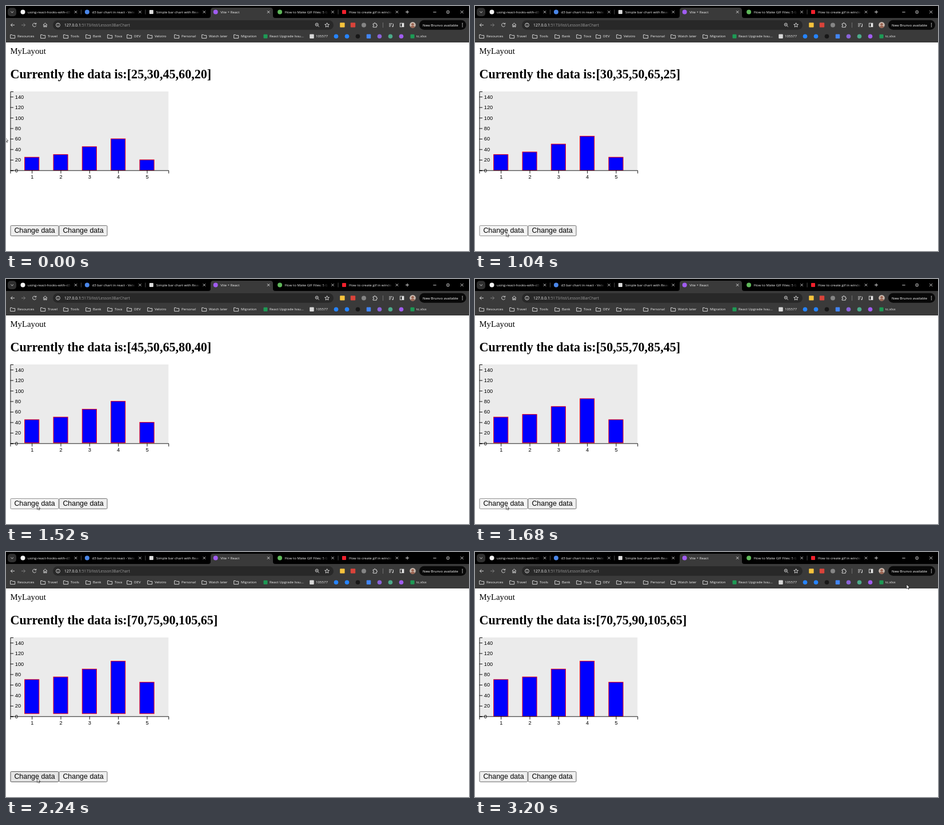
An HTML page that plays this animation: 810x430 px, repeating every 3.28 s.

```html
<!DOCTYPE html>
<html lang="en">
<head>
<meta charset="utf-8">
<title>Bar chart</title>
<style>
  html, body { margin: 0; width: 100%; height: 100%; overflow: hidden; background: #fff; }
  svg { display: block; }
  .ui { font: 6.15px "Open Sans", "Noto Sans", sans-serif; fill: #f4f4f4; }
  .line { fill: none; stroke: #e6e6e6; stroke-width: .9; }
  .serif { font-family: "Liberation Serif", "Times New Roman", serif; }
  .axis { font: 10px "Liberation Sans", Arial, sans-serif; }
  .axis path { fill: none; stroke: #000; }
  .bars rect { fill: #00f; stroke: #f00; }
  .button rect { fill: #efefef; stroke: #6c6c6c; }
  .button text { font: 12.45px "Liberation Sans", Arial, sans-serif; text-anchor: middle; }
  .button.hover rect { fill: #e5e5e5; stroke: #4f4f4f; }
  .button.active rect { fill: #f5f5f5; stroke: #8d8d8d; }
</style>
</head>
<body>
<svg id="stage" width="810" height="430" viewBox="0 0 810 430">
  <defs>
    <linearGradient id="fade">
      <stop offset="0" stop-color="#000" stop-opacity="0"/>
      <stop offset=".6" stop-color="#000"/>
    </linearGradient>
    <clipPath id="face"><circle cx="711.5" cy="33.3" r="5.3"/></clipPath>
  </defs>

  <rect width="810" height="430" fill="#fff"/>
  <rect width="810" height="22" fill="#000"/>
  <rect y="21" width="810" height="43" fill="#3a3a3a"/>
  <path d="M354 21q4 0 4-4V8q0-5 5-5h99q5 0 5 5v9q0 4 4 4z" fill="#3a3a3a"/>
  <rect x="3" y="3.3" width="15" height="14.6" rx="5" fill="#303030"/>
  <path class="line" d="M8.4 9.5l2.3 2.3 2.3-2.3"/>
  <g id="tabs"></g>
  <path class="line" d="M699 10.5h6M702 7.5v6M747.3 10.8h5.4M771.3 8.7h3.8v3.8h-3.8zM795.2 8l5 5m0-5l-5 5"/>

  <rect x="82" y="25" width="491" height="16.8" rx="8.4" fill="#282828"/>
  <g class="line">
    <path d="M15 33.4H8.4m3-3l-3 3 3 3"/>
    <path d="M27 33.4h6.6m-3-3l3 3-3 3" stroke="#858585"/>
    <path d="M52.2 31.4a3.1 3.1 0 1 0 .4 3M52.8 29.6v2.2h-2.4"/>
    <path d="M65 33.2l3.5-3.2 3.5 3.2M66 32.5v4.2h1.7v-2.5h1.6v2.5H71v-4.2"/>
    <circle cx="91" cy="33.4" r="3.4"/>
    <path d="M91 33v2.2M91 31.2v.8"/>
    <circle cx="543.8" cy="32.6" r="2.5"/>
    <path d="M545.7 34.5l2.2 2.2M542.6 32.6h2.4"/>
    <path d="M561.6 29.6l1.1 2.6 2.8.2-2.2 1.8.7 2.8-2.4-1.5-2.4 1.5.7-2.8-2.2-1.8 2.8-.2z"/>
    <path d="M642.2 31h2q0-1.6 1-1.6t1 1.6h2v2q1.4 0 1.4 1t-1.4 1v2.2h-6v-2q1.4 0 1.4-1.1t-1.4-1.1z"/>
    <path d="M659.5 29v9" stroke="#777"/>
    <path d="M670 31h6M670 33.4h4M670 35.8h3M677.5 31v4.5"/>
    <circle cx="676.5" cy="35.8" r=".8"/>
    <rect x="689.4" y="30.2" width="6.4" height="6.4"/>
  </g>
  <rect x="692.7" y="30.2" width="3.4" height="6.4" fill="#e6e6e6"/>
  <rect x="584.2" y="29.2" width="8.4" height="8.4" rx="1" fill="#f6c33c"/>
  <rect x="602.8" y="29.2" width="8.4" height="8.4" rx="1" fill="#d9433a"/>
  <circle cx="626" cy="33.4" r="4" fill="#858585"/>
  <g clip-path="url(#face)">
    <rect x="706" y="28" width="11" height="11" fill="#c9b8ad"/>
    <circle cx="711.5" cy="32.2" r="2.3" fill="#9a6350"/>
    <ellipse cx="711.5" cy="38.6" rx="4.3" ry="3.8" fill="#9a6350"/>
  </g>
  <rect x="723" y="24.8" width="82" height="17" rx="8.5" fill="#080808"/>
  <g class="ui">
    <text x="102" y="35.8" style="font-size:6.82px">127.0.0.1<tspan fill="#9b9b9b">:5173/list/Lesson3BarChart</tspan></text>
    <text x="729" y="35.6" fill="#fff">New Brunvo available</text>
  </g>
  <g fill="#e6e6e6"><circle cx="798.5" cy="30.6" r=".8"/><circle cx="798.5" cy="33.4" r=".8"/><circle cx="798.5" cy="36.2" r=".8"/></g>
  <g id="marks"></g>

  <text class="serif" x="7.5" y="84.4" font-size="14.76">MyLayout</text>
  <text class="serif" id="title" x="7.5" y="127" font-size="22.14" font-weight="bold"></text>

  <g transform="translate(7.5 150) scale(.9225)">
    <rect width="300" height="150" fill="#ebebeb"/>
    <g class="bars" id="bars"></g>
    <g class="axis" id="axis"></g>
  </g>

  <g class="button" id="first">
    <rect x="8" y="385.4" width="84" height="18" rx="1.4"/>
    <text x="50" y="398.4">Change data</text>
  </g>
  <g class="button">
    <rect x="93" y="385.4" width="84" height="18" rx="1.4"/>
    <text x="135" y="398.4">Change data</text>
  </g>
  <path id="cursor" d="M0 0V7.5L1.8 5.9 3 8.6 4.2 8 3 5.5H5.3Z" fill="#fff" stroke="#000" stroke-width=".6"/>
</svg>

<script>
const LOOP = 3280, STEP = 80;
const $ = id => document.getElementById(id);

function add(parent, tag, attrs, text) {
  const node = document.createElementNS("http://www.w3.org/2000/svg", tag);
  for (const key in attrs) node.setAttribute(key, attrs[key]);
  if (text !== undefined) node.textContent = text;
  parent.append(node);
  return node;
}

const label = (parent, x, y, text) => add(parent, "text", { class: "ui", x, y }, text);
const dot = (parent, x, y, fill, r = 4) => add(parent, "circle", { cx: x, cy: y, r, fill });
const square = (parent, x, y, fill, size = 7) =>
  add(parent, "rect", { x: x - size / 2, y: y - size / 2, width: size, height: size, rx: 1, fill });

// Tab strip
const tabs = [
  ["using-react-hooks-with-d3", dot, "#f2f2f2"],
  ["d3 bar chart in react - Velo", dot, "#4a86e8"],
  ["Simple bar chart with React", square, "#dcdcdc"],
  ["Vite + React", dot, "#a05cf0"],
  ["How to Make GIF Files: 5 G", dot, "#5fb85a"],
  ["How to create gif in windo", square, "#f0202c"]
];
tabs.forEach(([name, icon, color], i) => {
  const x = 29.5 + i * 112.4, g = $("tabs");
  icon(g, x, 10.5, color);
  label(g, x + 8.5, 12.8, name);
  if (i !== 3) add(g, "rect", { x: x + 73, y: 4, width: 20, height: 13, fill: "url(#fade)" });
  add(g, "path", { class: "line", d: `M${x + 90.4} 8.4l4.2 4.2m0-4.2l-4.2 4.2` });
  if (![2, 3, 5].includes(i)) add(g, "path", { class: "line", d: `M${x + 102} 6.5v8`, style: "stroke:#555" });
});

// Bookmarks
const marks = $("marks");
const folders = [["Resources", 20], ["Travel", 73], ["Tools", 113], ["Bank", 152], ["Tova", 190],
  ["DEV", 224], ["Velotro", 260], ["Personal", 307], ["Watch later", 355], ["Migration", 411]];
for (const [name, x] of folders) {
  add(marks, "path", { class: "line", d: `M${x - 12.3} 50.4h2.8l1 1.2h4.2v5h-8z` });
  label(marks, x, 55.3, name);
}
square(marks, 454, 53.2, "#1d9a55");
label(marks, 461, 55.3, "React Upgrade Issu...");
square(marks, 535, 53.2, "#d8d8d8", 7.5);
label(marks, 542, 55.3, "105577");
["#2684ff", "#2684ff", "#171717", "#4285f4", "#8a63d8", "#4caa8a", "#a05cf0"].forEach((color, i) =>
  (i === 3 ? square : dot)(marks, 577.5 + i * 19, 53.2, color, i === 3 ? 7.5 : 3.8));
square(marks, 711, 53.2, "#1d9a55");
label(marks, 718, 55.3, "tc.xlsx");

// Chart
const base = [25, 30, 45, 60, 20];
const band = 300 / 5.5;
const bars = base.map((v, i) => add($("bars"), "rect", { x: band * (i + .5), width: band / 2 }));
const axis = $("axis");
add(axis, "path", { d: "M6 .5H.5V150.5H6M.5 156V150.5H300.5V156" });
for (let v = 0; v <= 140; v += 20) {
  const y = 150.5 - v;
  add(axis, "path", { d: `M0 ${y}h6` });
  add(axis, "text", { x: 9, y: y + 3.2 }, v);
}
base.forEach((v, i) => {
  const x = band * (i + .75) + .5;
  add(axis, "path", { d: `M${x} 150v6` });
  add(axis, "text", { x, y: 166.1, "text-anchor": "middle" }, i + 1);
});

// Pointer path: time, x, y
const path = [[0, -1.5, 231], [80, 0, 250], [320, 30, 370], [480, 50, 423], [560, 52, 417],
  [800, 54.5, 398], [880, 54.5, 397], [2320, 54.5, 397], [2400, 250, 320], [2480, 520, 200],
  [2560, 692, 105], [2800, 731, 80], [3200, 755, 57]];

function pointer(t) {
  const i = Math.max(1, path.findIndex(p => p[0] >= t));
  const [t0, x0, y0] = path[i - 1], [t1, x1, y1] = path[i];
  const k = (t - t0) / (t1 - t0);
  return [x0 + (x1 - x0) * k, y0 + (y1 - y0) * k];
}

const FIRST = 960, PERIOD = 160, CLICKS = 9;

function draw(t) {
  const clicks = Math.min(CLICKS, Math.max(0, Math.floor((t - FIRST) / PERIOD) + 1));
  const age = t - FIRST - (clicks - 1) * PERIOD;
  const data = base.map(v => v + clicks * 5);
  // Top edges jump at once; heights catch up after each click.
  let lag = 0;
  if (clicks && age < STEP) lag = 5;
  else if (clicks > 1 && age < PERIOD) lag = 1;
  bars.forEach((bar, i) => {
    bar.setAttribute("y", 150 - data[i]);
    bar.setAttribute("height", data[i] - lag);
  });
  $("title").textContent = `Currently the data is:[${data}]`;

  const [x, y] = pointer(t);
  $("cursor").setAttribute("transform", `translate(${x} ${y})`);
  const over = x > 8 && x < 92 && y > 385 && y < 403;
  const pressed = t >= FIRST - STEP && t < FIRST + (CLICKS - 1) * PERIOD && (t / STEP) % 2 === 1;
  $("first").setAttribute("class", "button" + (over ? pressed ? " active" : " hover" : ""));
}

const start = performance.now();
function tick() {
  const t = (performance.now() - start) % LOOP;
  draw(Math.floor(t / STEP) * STEP);
  requestAnimationFrame(tick);
}
tick();
</script>
</body>
</html>
```
